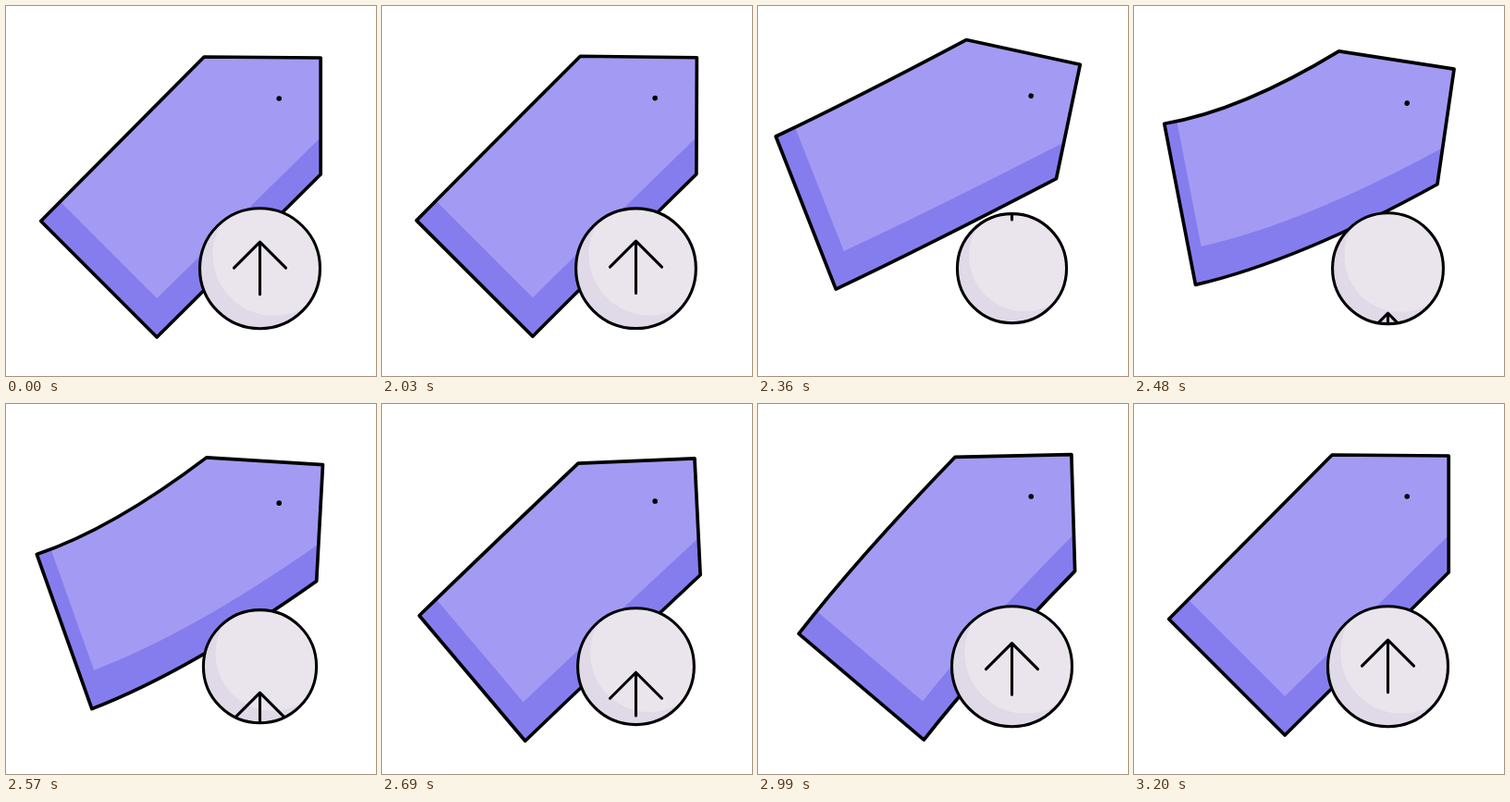
An HTML page with a canvas that plays this animation: 400x400 px, repeating every 3230 ms.

```html
<!DOCTYPE html>
<html>
<head>
<meta charset="utf-8">
<style>
  html, body { margin: 0; width: 100%; height: 100%; overflow: hidden; background: #fff; }
  canvas { display: block; width: 400px; height: 400px; }
</style>
</head>
<body>
<canvas id="stage" width="400" height="400"></canvas>
<script>
const ctx = document.getElementById('stage').getContext('2d');
const LOOP = 3230, START = 2000, STEP = 30, END = 40;
const RAD = Math.PI / 180;

const clamp = (v, lo, hi) => Math.min(hi, Math.max(lo, v));
const ease = u => u * u * (3 - 2 * u);

// Eased swing from rest through a few extremes, given as [step, value], and back to rest.
function sway(n, rest, extremes, end = END) {
  let from = [0, rest];
  for (const to of [...extremes, [end, rest]]) {
    if (n < to[0]) {
      return from[1] + (to[1] - from[1]) * ease((n - from[0]) / (to[0] - from[0]));
    }
    from = to;
  }
  return rest;
}

// Tag corners and shade end, relative to the hole.
const A = [-81, -45], B = [45, -44], C = [45, 82], SHADE_END = [45, 42];
const SHADE = 42, TAIL_LENGTH = 250, TAIL_HALF = 88.7;

// The tail end turns by the bend; its centre follows at about half that angle.
function tailEnds(bend) {
  const swing = (135 + bend * 0.55) * RAD, turn = (45 + bend) * RAD;
  const length = TAIL_LENGTH * Math.cos(bend / 2 * RAD);
  const x = (A[0] + C[0]) / 2 + length * Math.cos(swing);
  const y = (A[1] + C[1]) / 2 + length * Math.sin(swing);
  const dx = TAIL_HALF * Math.cos(turn), dy = TAIL_HALF * Math.sin(turn);
  return [[x - dx, y - dy], [x + dx, y + dy]];
}

// Curved edge whose control point sits at the given share of the way from p to q.
function bow(p, q, sag, share) {
  const dx = q[0] - p[0], dy = q[1] - p[1], k = 2 * sag / Math.hypot(dx, dy);
  ctx.quadraticCurveTo(p[0] + dx * share - dy * k, p[1] + dy * share + dx * k, ...q);
}

function disc(x, y, r, color) {
  ctx.beginPath();
  ctx.arc(x, y, r, 0, 2 * Math.PI);
  ctx.fillStyle = color;
  ctx.fill();
}

function drawTag(n) {
  const tilt = sway(n, 0, [[12, 11.8], [25, -3.8]]);
  const holeY = sway(n, 100, [[7.5, 91.4], [18.5, 107.2]], 31);
  const bend = sway(n, 0, [[7, -5], [16.5, 26], [28, -4.8]]);
  const sag = sway(n, 0, [[8, -5], [17, 10], [27, -6]]);
  const [E, D] = tailEnds(bend);
  const corner = [D[0], D[1] - SHADE];

  const outline = () => {
    ctx.beginPath();
    ctx.moveTo(...A);
    ctx.lineTo(...B);
    ctx.lineTo(...C);
    bow(C, D, -sag, 0.6);
    ctx.lineTo(...E);
    bow(E, A, sag, 0.4);
    ctx.closePath();
  };

  ctx.save();
  ctx.translate(295.2, holeY);
  ctx.rotate(tilt * RAD);

  ctx.save();
  outline();
  ctx.fillStyle = '#857dee';
  ctx.fill();
  ctx.clip();
  ctx.beginPath();
  ctx.moveTo(...corner);
  bow(corner, SHADE_END, sag, 0.4);
  ctx.lineTo(...B);
  ctx.lineTo(...A);
  ctx.lineTo(E[0], E[1] - SHADE);
  ctx.fillStyle = '#a39bf3';
  ctx.fill();
  ctx.restore();

  outline();
  ctx.lineWidth = 3.7;
  ctx.stroke();
  disc(0, 0, 2.8, '#000');
  ctx.restore();
}

// The arrow shrinks into the top of the badge, then rises from below.
function drawArrow(n, r) {
  let tip = -28.5, wing = 28, bottom = 28;
  if (n < 14) {
    const up = 90 * ease(n / 15);
    tip = Math.max(-r, tip - up);
    wing = clamp(-0.5 - up * 0.93 - tip, 0, wing);
    bottom -= up;
  } else {
    const down = 92 * clamp(1 - (n - 14) / 23.5, 0, 1) ** 2;
    tip += down;
    bottom += down * 0.72;
  }
  if (bottom <= tip) return;
  ctx.beginPath();
  ctx.moveTo(0, bottom);
  ctx.lineTo(0, tip);
  if (wing > 0) {
    ctx.moveTo(-wing, tip + wing);
    ctx.lineTo(0, tip);
    ctx.lineTo(wing, tip + wing);
  }
  ctx.stroke();
}

function drawBadge(n) {
  const r = sway(n, 65, [[11, 59]], 31), k = r / 65;
  ctx.save();
  ctx.translate(274.5, 283.7);
  ctx.lineWidth = 3.1;

  ctx.save();
  disc(0, 0, r, '#e0d9e7');
  ctx.clip();
  disc(15 * k, -15 * k, 66 * k, '#eae5ec');
  drawArrow(n, r);
  ctx.restore();

  ctx.beginPath();
  ctx.arc(0, 0, r, 0, 2 * Math.PI);
  ctx.stroke();
  ctx.restore();
}

function render(now) {
  const n = Math.max(0, Math.floor((now % LOOP - START) / STEP));
  ctx.fillStyle = '#fff';
  ctx.fillRect(0, 0, 400, 400);
  ctx.strokeStyle = '#000';
  ctx.lineCap = ctx.lineJoin = 'round';
  drawTag(n);
  drawBadge(n);
}

function tick() {
  render(performance.now());
  requestAnimationFrame(tick);
}
tick();
</script>
</body>
</html>
```
